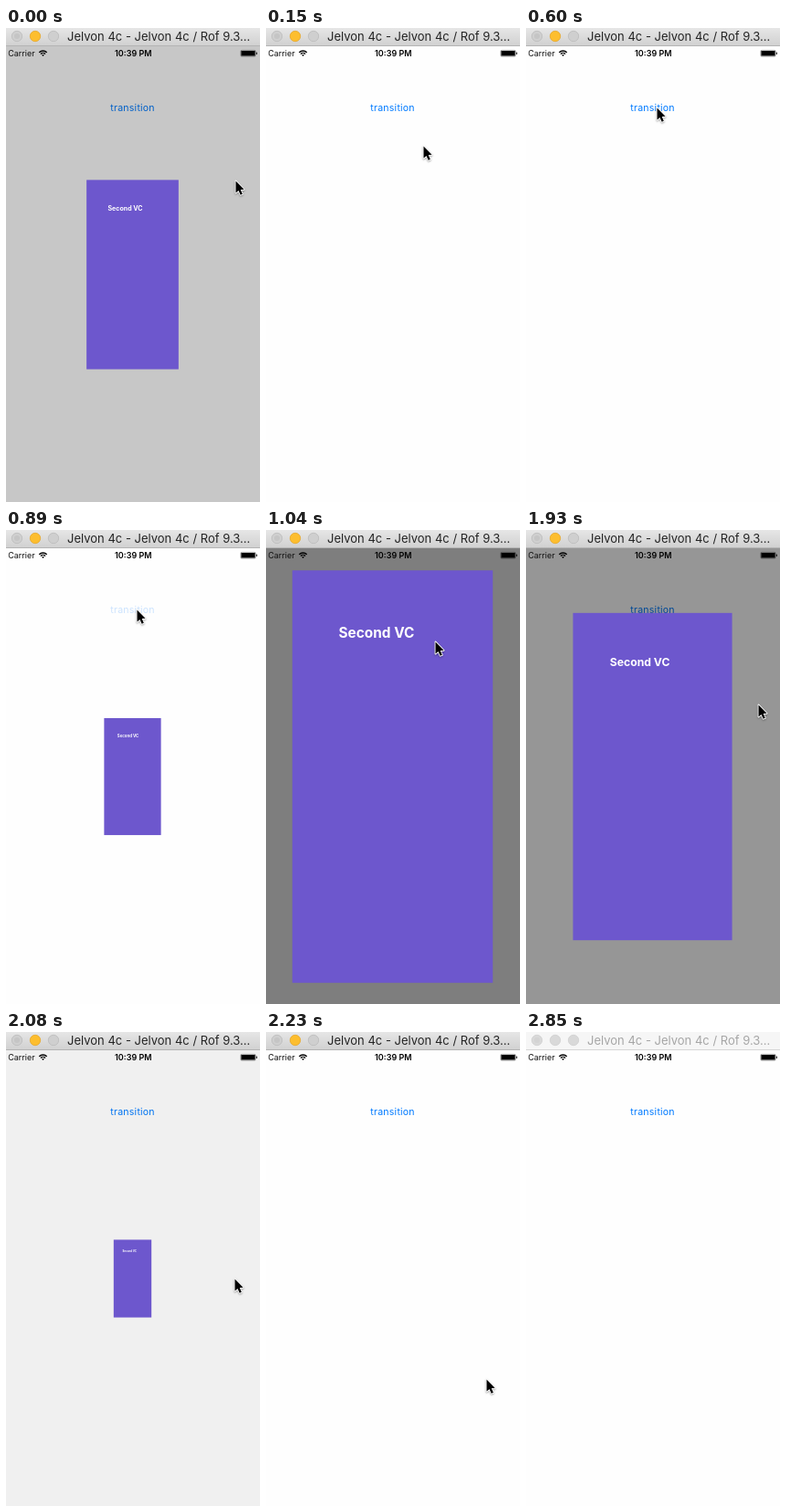
Recreate the animation shown at these times as an HTML page with a canvas. Size 278x519 px, loop 2900 ms.

```html
<!DOCTYPE html>
<html lang="en">
<head>
<meta charset="utf-8">
<title>Modal transition</title>
<style>
html, body { margin: 0; width: 100%; height: 100%; overflow: hidden; background: #fefefe; }
canvas { display: block; width: 278px; height: 519px; }
</style>
</head>
<body>
<canvas id="stage"></canvas>
<script>
const W = 278, H = 519, LOOP = 2900;
const FONT = 'Inter, "Liberation Sans", sans-serif';
const canvas = document.getElementById('stage');
const ctx = canvas.getContext('2d');
const dpr = window.devicePixelRatio || 1;
canvas.width = W * dpr;
canvas.height = H * dpr;

// Each pose holds until the next one: start, pointer, card scale, backdrop opacity.
const fade = s => 0.5 * (s - 0.1) / 0.9;
const leave = (at, x, y, scale) => ({ at, x, y, scale, dim: fade(scale) });
const poses = [
  leave(0, 251, 167, 0.487),
  { at: 150, x: 172, y: 129 },
  { at: 300, x: 149, y: 112 },
  { at: 450, x: 143, y: 98 },
  { at: 600, x: 143, y: 87 },
  { at: 890, x: 143, y: 87, scale: 0.301, dim: 0, pressed: true },
  { at: 1040, x: 185, y: 122, scale: 1.061, dim: 0.5 },
  { at: 1190, x: 232, y: 165, scale: 1, dim: 0.5 },
  { at: 1340, x: 250, y: 187, scale: 1, dim: 0.5 },
  { at: 1490, x: 254, y: 191, scale: 1, dim: 0.5 },
  leave(1930, 254, 191, 0.842),
  leave(2080, 250, 270, 0.2),
  { at: 2230, x: 241, y: 380 },
  { at: 2380, x: 246, y: 463 },
  { at: 2530 },
  { at: 2850, inactive: true }
];

function text(str, x, y, size, color, weight = 400, align = 'left') {
  ctx.font = `${weight} ${size}px ${FONT}`;
  ctx.textAlign = align;
  ctx.fillStyle = color;
  ctx.fillText(str, x, y);
}

function rect(x, y, w, h, color) {
  ctx.fillStyle = color;
  ctx.fillRect(x, y, w, h);
}

function disc(x, y, r, fill, stroke) {
  ctx.beginPath();
  ctx.arc(x, y, r, 0, Math.PI * 2);
  ctx.fillStyle = fill;
  ctx.fill();
  if (stroke) {
    ctx.strokeStyle = stroke;
    ctx.lineWidth = 0.8;
    ctx.stroke();
  }
}

function drawTitleBar(inactive) {
  const g = ctx.createLinearGradient(0, 0, 0, 19);
  g.addColorStop(0, inactive ? '#f6f6f6' : '#e6e6e6');
  g.addColorStop(1, inactive ? '#f6f6f6' : '#d1d1d1');
  rect(0, 0, W, 19, g);
  rect(0, 19, W, 1, inactive ? '#d6d6d6' : '#b4b4b4');
  const grey = inactive ? '#d9d9d9' : '#cfcfcf';
  const ring = inactive ? '#d0d0d0' : '#bcbcbc';
  disc(12, 9, 5.7, grey, ring);
  disc(12, 9, 3, inactive ? '#d3d3d3' : '#c5c5c5');
  if (inactive) disc(32, 9, 5.7, grey, ring);
  else disc(32, 9, 5.7, '#fdbe2e', '#e6a82a');
  disc(52, 9, 5.7, grey, ring);
  text('Jelvon 4c - Jelvon 4c / Rof 9.3...', 67, 14, 13, inactive ? '#a6a6a6' : '#242424');
}

function drawWifi(x, y) {
  ctx.strokeStyle = '#000';
  ctx.lineWidth = 1.3;
  for (const r of [3.6, 6]) {
    ctx.beginPath();
    ctx.arc(x, y, r, -Math.PI * 0.75, -Math.PI * 0.25);
    ctx.stroke();
  }
  ctx.beginPath();
  ctx.moveTo(x, y);
  ctx.arc(x, y, 2, -Math.PI * 0.75, -Math.PI * 0.25);
  ctx.fillStyle = '#000';
  ctx.fill();
}

function drawStatusBar() {
  text('Carrier', 2.2, 31, 9, '#111');
  drawWifi(40.5, 31);
  text('10:39 PM', 139.3, 31, 9, '#000', 600, 'center');
  ctx.strokeStyle = 'rgba(0,0,0,.5)';
  ctx.lineWidth = 0.6;
  ctx.beginPath();
  ctx.roundRect(256.8, 24.3, 16.4, 6.9, 1.3);
  ctx.stroke();
  rect(257.4, 25, 15.2, 5.5, '#000');
  rect(273.8, 26.6, 1, 2.3, '#000');
}

function drawCard(scale) {
  ctx.save();
  ctx.translate(138.5, 270);
  ctx.scale(scale, scale);
  rect(-103.4, -212.8, 206.8, 425.6, '#6d57cd');
  text('Second VC', -16.5, -143.3, 14.5, '#fff', 700, 'center');
  ctx.restore();
}

function drawButton(pressed) {
  ctx.letterSpacing = '0.2px';
  text('transition', 138.6, 91, 10.6, pressed ? 'rgba(0,122,255,.2)' : '#007aff', 400, 'center');
  ctx.letterSpacing = '0px';
}

const arrow = new Path2D('M.5 .4V13.6L3.5 10.9L5.7 15.7L7.8 14.8L5.7 10.1L9.6 9.8Z');

function drawPointer(x, y) {
  ctx.save();
  ctx.translate(x, y);
  ctx.shadowColor = 'rgba(0,0,0,.35)';
  ctx.shadowBlur = 2 * dpr;
  ctx.shadowOffsetY = dpr;
  ctx.strokeStyle = '#fff';
  ctx.lineWidth = 1.8;
  ctx.lineJoin = 'round';
  ctx.stroke(arrow);
  ctx.shadowColor = 'transparent';
  ctx.fillStyle = '#000';
  ctx.fill(arrow);
  ctx.restore();
}

function draw(time) {
  const pose = poses.findLast(p => p.at <= time);
  ctx.setTransform(dpr, 0, 0, dpr, 0, 0);
  rect(0, 0, W, H, '#fefefe');
  drawButton(pose.pressed);
  if (pose.scale) {
    rect(0, 20, W, H - 20, `rgba(0,0,0,${pose.dim})`);
    drawCard(pose.scale);
  }
  drawStatusBar();
  drawTitleBar(pose.inactive);
  if (pose.x) drawPointer(pose.x, pose.y);
}

const start = performance.now();
function tick() {
  draw((performance.now() - start) % LOOP);
  requestAnimationFrame(tick);
}
tick();
</script>
</body>
</html>
```
